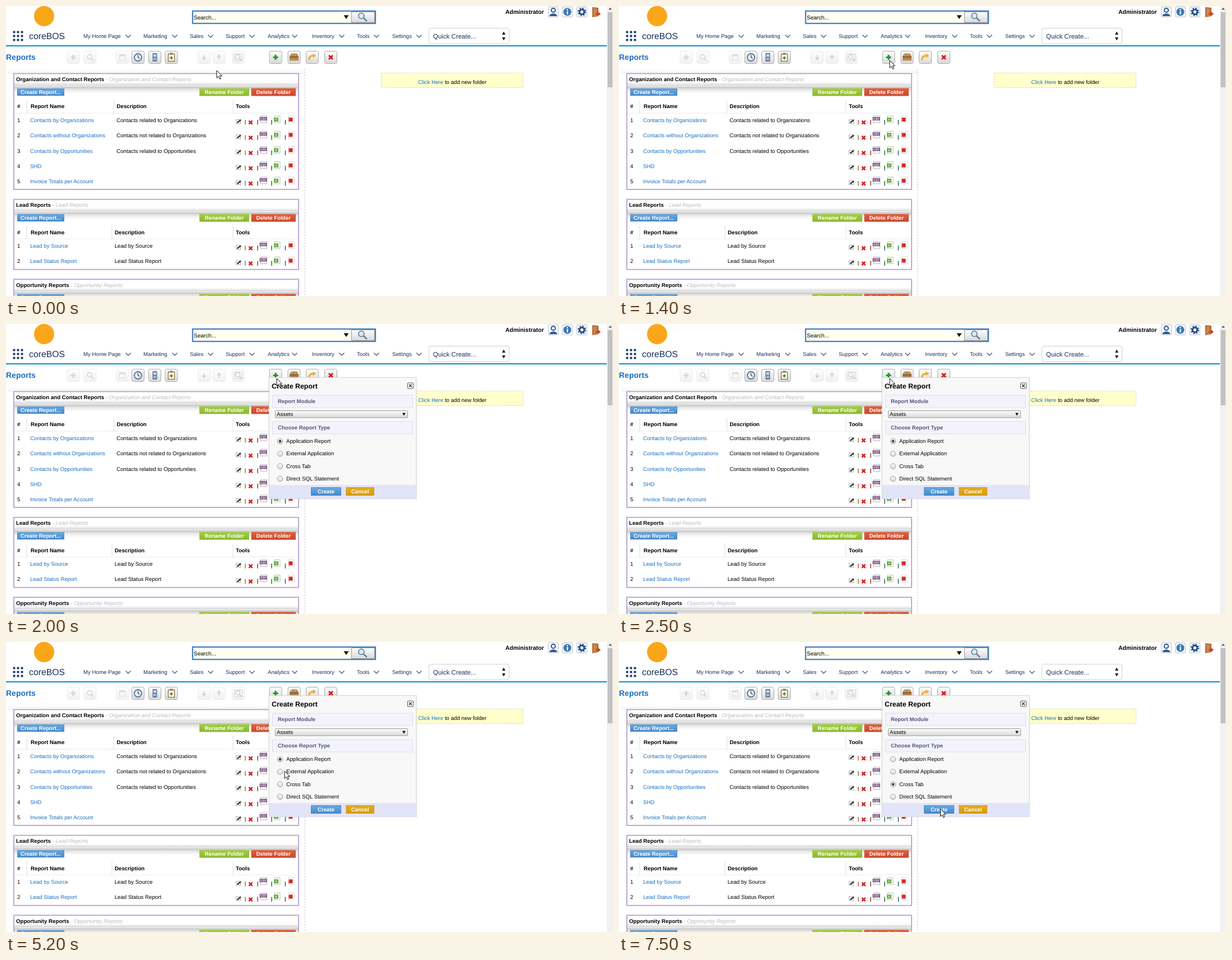
An HTML page for the animation above (8000 ms loop, 1083 by 517 pixels).

```html
<!DOCTYPE html>
<html lang="en">
<head>
<meta charset="utf-8">
<title>Reports</title>
<style>
  html, body { margin: 0; width: 100%; height: 100%; overflow: hidden; background: #fff; }
  svg { display: block; }
  text { font-family: "Liberation Sans", Arial, sans-serif; font-size: 9.7px; white-space: pre; text-rendering: geometricPrecision; }
</style>
</head>
<body>
<svg id="stage" width="1083" height="517" viewBox="0 0 1083 517">
  <defs>
    <linearGradient id="button" x2="0" y2="1"><stop stop-color="#fdfdfd"/><stop offset="1" stop-color="#d9d9d9"/></linearGradient>
    <linearGradient id="ridge" x2="0" y2="1"><stop stop-color="#fff"/><stop offset="1" stop-color="#d4d4d4"/></linearGradient>
    <linearGradient id="fall" x2="0" y2="1"><stop stop-color="#c4c4c4"/><stop offset=".5" stop-color="#ececec"/><stop offset="1" stop-color="#fff"/></linearGradient>
    <linearGradient id="blue" x2="0" y2="1"><stop stop-color="#6aaae2"/><stop offset="1" stop-color="#4488cc"/></linearGradient>
    <linearGradient id="green" x2="0" y2="1"><stop stop-color="#a4cf3c"/><stop offset="1" stop-color="#8ab82c"/></linearGradient>
    <linearGradient id="red" x2="0" y2="1"><stop stop-color="#e2603f"/><stop offset="1" stop-color="#cc4527"/></linearGradient>
    <linearGradient id="amber" x2="0" y2="1"><stop stop-color="#e5ae22"/><stop offset="1" stop-color="#d59a08"/></linearGradient>
  </defs>
  <g id="page"></g>
  <g id="dialog"></g>
  <path id="cursor" d="M0 0V13.3L3.1 10.5L5.2 15.3L7.5 14.3L5.4 9.7H9.4Z" fill="#fff" stroke="#111" stroke-width="1" stroke-linejoin="round"/>
</svg>
<script>
const LINK = '#1a70c0';
const get = id => document.getElementById(id);

// Markup helpers
const text = (x, y, s, o = '') => `<text x="${x}" y="${y}" ${o}>${s}</text>`;
const bold = (x, y, s, o = '') => text(x, y, s, 'font-weight="bold" ' + o);
const rect = (x, y, w, h, fill, o = '') => `<rect x="${x}" y="${y}" width="${w}" height="${h}" fill="${fill}" ${o}/>`;
const circle = (x, y, r, fill, o = '') => `<circle cx="${x}" cy="${y}" r="${r}" fill="${fill}" ${o}/>`;
const line = (d, color, w = 1, o = '') => `<path d="${d}" fill="none" stroke="${color}" stroke-width="${w}" ${o}/>`;
const shape = (d, fill, o = '') => `<path d="${d}" fill="${fill}" ${o}/>`;
const at = (x, y, body, o = '') => `<g transform="translate(${x} ${y})" ${o}>${body}</g>`;

const button = (x, y, w, h, color, label, edge) =>
  rect(x + .5, y + .5, w - 1, h - 1, `url(#${color})`, `stroke="${edge}"`) +
  bold(x + w / 2, y + h / 2 + 3.2, label, 'fill="#fff" text-anchor="middle"');

// Icons are centred on 0,0
const lens = color => circle(-1, -1, 4, 'none', `stroke="${color}" stroke-width="1.5"`) + line('M2 2L6 6', color, 2);
const plus = color => line('M-4.5 0H4.5M0 -4.5V4.5', color, 3.2);
const cross = (r, w) => line(`M${-r} ${-r}L${r} ${r}M${r} ${-r}L${-r} ${r}`, '#d8141c', w);
const icons = {
  add: plus('#1f9a26'),
  addGrey: plus('#999'),
  find: lens('#888'),
  calendar: rect(-5, -5, 10, 10, '#eee', 'stroke="#999"') + rect(-5, -5, 10, 3, '#aaa'),
  clock: circle(0, 0, 6.5, '#e8f0fa', 'stroke="#52718f" stroke-width="1.8"') + line('M0 -4V0L3 2', '#333', 1.2),
  device: rect(-4, -7.5, 8, 15, '#5d7c9c', 'rx="1"') + rect(-2.5, -5.5, 5, 4.5, '#c4ddf4') + rect(-2.5, 1, 5, 4, '#aebfd2'),
  clip: rect(-5.5, -6, 11, 13, '#fff', 'stroke="#a8743a" stroke-width="1.5"') + rect(-2.5, -8, 5, 3, '#777') + at(0, 1, line('M-3 0H3M0 -3V3', '#2f9a35', 2)),
  down: line('M0 -4V3M-3 0L0 4L3 0', '#777', 1.5),
  up: line('M0 4V-3M-3 0L0 -4L3 0', '#777', 1.5),
  scan: rect(-7, -6, 14, 12, '#eee', 'stroke="#888"') + at(0, 0, lens('#777'), 'stroke-width="1"'),
  box: shape('M-8 -2L-5 -7H5L8 -2V6H-8Z', '#b98d58') + shape('M-8 -2H8V1H-8Z', '#8f6736') + line('M-4 -7V-3M3 -7V-3', '#d8b788'),
  redo: line('M-6 5C-6 -1 -3 -3 2 -3', '#e9b034', 3) + shape('M1 -7L7 -3L1 1Z', '#e9b034'),
  remove: cross(3.5, 2.8)
};

const tool = (x, name, faint) => at(x, 91.5,
  rect(-11, -11, 22, 22, 'url(#button)', `rx="3" stroke="${faint ? '#ccc' : '#aaa'}"`) + icons[name],
  faint ? 'opacity=".36"' : '');

function header() {
  let out = circle(68, 18, 18, '#f9a61a');
  out += rect(333, 9, 326, 22, '#fff', 'stroke="#4681c0" stroke-width="2.4"') +
    rect(334.5, 10.5, 281, 19, '#fffff0') + text(335, 23.5, 'Search...', 'font-size="10" style="font-size:10px"') +
    shape('M602.5 16.5H611.5L607 23Z', '#000') +
    rect(616.5, 10.5, 41, 19, 'url(#button)', 'stroke="#999"') +
    circle(634, 17.5, 5, '#d6eaf8', 'stroke="#5b7d98" stroke-width="1.6"') + line('M638 21.5L644 27', '#6a7c88', 2.4);
  out += bold(891, 14, 'Administrator', 'style="font-size:10.5px"');
  for (const x of [976, 1001, 1027]) out += rect(x - 8.5, 1.5, 18, 18, '#f4f7fa', 'rx="1.5" stroke="#bcc6d0"');
  out += circle(976.5, 7.5, 3.6, '#fff', 'stroke="#28588e" stroke-width="2"') + shape('M969.5 18C970 12 983 12 983.5 18Z', '#28588e');
  out += circle(1001.5, 10.5, 7, '#3c78ae') + rect(1000.5, 9, 2.2, 6, '#fff') + circle(1001.6, 6.6, 1.3, '#fff');
  out += circle(1027.5, 10.5, 4.2, 'none', 'stroke="#244f86" stroke-width="3"') +
    circle(1027.5, 10.5, 6.4, 'none', 'stroke="#244f86" stroke-width="2.2" stroke-dasharray="2.5 2.53"');
  out += shape('M1046 2L1057 3V18L1046 20Z', '#b56a35') + shape('M1048 4L1054 4.5V17L1048 18Z', '#c98550') +
    line('M1052 14H1058', '#d83a24', 2.6) + shape('M1057 10.5L1061 14L1057 17.5Z', '#d83a24');

  for (let i = 0; i < 9; i++) out += circle(14.5 + i % 3 * 7, 46.5 + (i / 3 | 0) * 7, 2.2, '#24456f');
  out += text(41, 59, 'coreBOS', 'fill="#16325c" style="font-size:15.8px"');
  const menu = [['My Home Page', 138, 218], ['Marketing', 245, 301], ['Sales', 328, 365], ['Support', 392, 439],
    ['Analytics', 467, 515], ['Inventory', 546, 599], ['Tools', 626, 661], ['Settings', 689, 737]];
  for (const [name, x, arrow] of menu)
    out += text(x, 57, name, 'fill="#16325c"') + line(`M${arrow - 4.5} 51.5L${arrow} 56L${arrow + 4.5} 51.5`, '#47648a', 1.5);
  out += rect(754.5, 39.5, 143, 27.5, '#fff', 'rx="3.5" stroke="#d0cfce"') +
    text(762, 58, 'Quick Create...', 'fill="#16325c" style="font-size:11.5px"') +
    shape('M885 51L888 45.5L891 51ZM885 56L888 61.5L891 56Z', '#111');
  return out + rect(0, 69.8, 1072, 2.3, '#1797d2');
}

function toolbar() {
  const tools = [[120, 'addGrey', 1], [150, 'find', 1], [207.5, 'calendar', 1], [235.5, 'clock'], [265.5, 'device'],
    [295, 'clip'], [353.5, 'down', 1], [380, 'up', 1], [414.5, 'scan', 1], [481, 'add'], [514, 'box'], [546.5, 'redo'], [579.5, 'remove']];
  return bold(0, 96.2, 'Reports', `fill="${LINK}" style="font-size:14px"`) + tools.map(t => tool(...t)).join('');
}

const rowTools = y => at(415.5, y + 2.5,
    rect(-5, -3.5, 8, 7, '#fff', 'stroke="#aaa"') + line('M-3 2L3.5 -3', '#333', 2.4)) +
  at(436.5, y + 4, cross(3.1, 2.5)) +
  [[427, '#b06a34'], [449, '#9a3c1a'], [474, '#2f6a40'], [498.5, '#24607c']].map(([x, c]) => rect(x - .8, y - .5, 1.5, 8.5, c)).join('') +
  at(459.5, y - 1.5, rect(-5, -6, 11, 12, '#fff', 'stroke="#bbb0c0"') + rect(-7, -4, 13, 6, '#765279') +
    text(-.5, .8, 'CSV', 'fill="#fff" text-anchor="middle" style="font-size:5px;font-weight:bold"')) +
  at(483.5, y - 1.5, rect(-4.5, -6, 10, 12, '#f6faf3', 'stroke="#bac8b4"') + rect(-5.5, -3, 8, 7, '#68aa4a') + line('M-3 -1L0 2M0 -1L-3 2', '#e4f4da')) +
  at(508.5, y - 1.5, rect(-4.5, -6, 10, 12, '#fff', 'stroke="#d8d8d8"') + rect(-4, -3, 7, 7, '#d52b24'));

function panel(top, height, name, divider, rows) {
  const y = d => top + d;
  let out = rect(14, y(1), 508, height - 2, '#fff', 'stroke="#b9a0d2" stroke-width="1.8"') +
    rect(15, y(16), 506, 7, 'url(#ridge)') + rect(15, y(23), 506, 1, '#fafafa') + rect(15, y(24), 506, 13, 'url(#fall)');
  out += bold(18, y(14.5), name + `<tspan font-weight="normal" font-style="italic" fill="#bbb"> - ${name}</tspan>`);
  out += button(20, y(27.5), 84, 13, 'blue', 'Create Report...', '#4d88c2') +
    button(345, y(27), 89, 14, 'green', 'Rename Folder', '#9cbf55') +
    button(437.5, y(27), 79.5, 14, 'red', 'Delete Folder', '#cd6048');
  out += [[20, '#'], [44, 'Report Name'], [divider + 5, 'Description'], [410, 'Tools']].map(([x, s]) => bold(x, y(62.8), s)).join('');
  out += rect(15, y(71), 506, 1, '#ececec');
  for (const x of [37, divider, 405]) out += rect(x - .5, y(48), 1, 24, '#ddd');
  rows.forEach(([link, info], i) => {
    const mid = y(84 + i * 27.25);
    out += text(20, mid + 3.5, i + 1) + text(43, mid + 3.5, link, `fill="${LINK}"`) + text(divider + 4.7, mid + 3.5, info) + rowTools(mid);
  });
  return out;
}

function page() {
  return header() + toolbar() +
    rect(4, 112, 529, 9, 'url(#ridge)', 'opacity=".3"') +
    line('M533 112V517', '#ccc', 1, 'stroke-dasharray="3 2"') +
    panel(119.5, 208.5, 'Organization and Contact Reports', 192.5, [
      ['Contacts by Organizations', 'Contacts related to Organizations'],
      ['Contacts without Organizations', 'Contacts not related to Organizations'],
      ['Contacts by Opportunities', 'Contacts related to Opportunities'],
      ['SHD', ''], ['Invoice Totals per Account', '']]) +
    panel(343.7, 127, 'Lead Reports', 189, [['Lead by Source', 'Lead by Source'], ['Lead Status Report', 'Lead Status Report']]) +
    panel(486.2, 127, 'Opportunity Reports', 189, []) +
    rect(669.5, 119.5, 253, 26, '#ffffcc', 'stroke="#d8d8a0" stroke-dasharray="3 2"') +
    text(735.5, 139.3, `<tspan fill="${LINK}">Click Here</tspan> to add new folder`) +
    rect(1072, 0, 11, 517, '#f1f1f1') + rect(1073.5, 11, 8.5, 134, '#c1c1c1') + shape('M1075 6.5L1078 3L1081 6.5Z', '#555');
}

const choices = ['Application Report', 'External Application', 'Cross Tab', 'Direct SQL Statement'];
const choiceY = i => 209 + i * 22.3;

function dialog() {
  const heading = (y, s) => rect(475.5, y, 250, 22, '#f3f3fc', 'stroke="#dedeee"') + bold(485, y + 14, s, 'fill="#555577" style="font-size:9.6px"');
  return rect(468, 94.5, 265.5, 218, '#000', 'opacity=".07"') +
    rect(469.5, 95.5, 262.5, 216, '#f8f8f8', 'stroke="#dadada"') +
    bold(474, 114.7, 'Create Report', 'style="font-size:12.4px"') +
    rect(716.5, 105, 10, 10, '#fff', 'rx="1" stroke="#555"') + line('M719 107.5L724 112.5M724 107.5L719 112.5', '#333', 1.4) +
    heading(127, 'Report Module') +
    rect(480.5, 154.5, 236, 12.5, 'url(#button)', 'rx="1" stroke="#999"') + text(483, 164.3, 'Assets') +
    shape('M707 158.5H713L710 163.5Z', '#111') +
    heading(174, 'Choose Report Type') +
    choices.map((s, i) => circle(489, choiceY(i), 4.7, 'url(#button)', 'stroke="#999"') + text(500, choiceY(i) + 3, s)).join('') +
    circle(489, 0, 2.4, '#444', 'id="mark"') +
    rect(470, 287, 262, 24.5, '#e2e4f8') +
    button(544, 291, 54, 15, 'blue', 'Create', '#4d88c2') + button(606.5, 291, 50.5, 15, 'amber', 'Cancel', '#c99a2a');
}

get('page').innerHTML = page();
get('dialog').innerHTML = dialog();

// Pointer stops: time, x, y
const stops = [
  [0, 376, 115], [100, 385, 121], [300, 384, 126], [400, 392, 129], [500, 412, 124], [600, 438, 115],
  [700, 460, 106.5], [800, 471, 101], [900, 470, 101], [1100, 487, 96], [1200, 483, 97],
  [2300, 486, 97], [2400, 490, 97], [2500, 483, 97], [4500, 529.5, 197], [4700, 528.5, 200],
  [4900, 498, 215], [5200, 497, 230], [5400, 492, 248], [5700, 491, 247.5], [6600, 510, 249],
  [6800, 582, 287], [7100, 576, 287], [7500, 573.5, 297.5]
];
const LOOP = 8000, OPEN = 2000, PICK = 6300;
const start = performance.now();

function draw() {
  const t = Math.max(0, performance.now() - start) % LOOP;
  const [, x, y] = stops.filter(s => s[0] <= t).pop();
  get('cursor').setAttribute('transform', `translate(${x} ${y})`);
  get('dialog').setAttribute('display', t < OPEN ? 'none' : 'inline');
  get('mark').setAttribute('cy', choiceY(t < PICK ? 0 : 2));
  requestAnimationFrame(draw);
}
draw();
</script>
</body>
</html>
```
